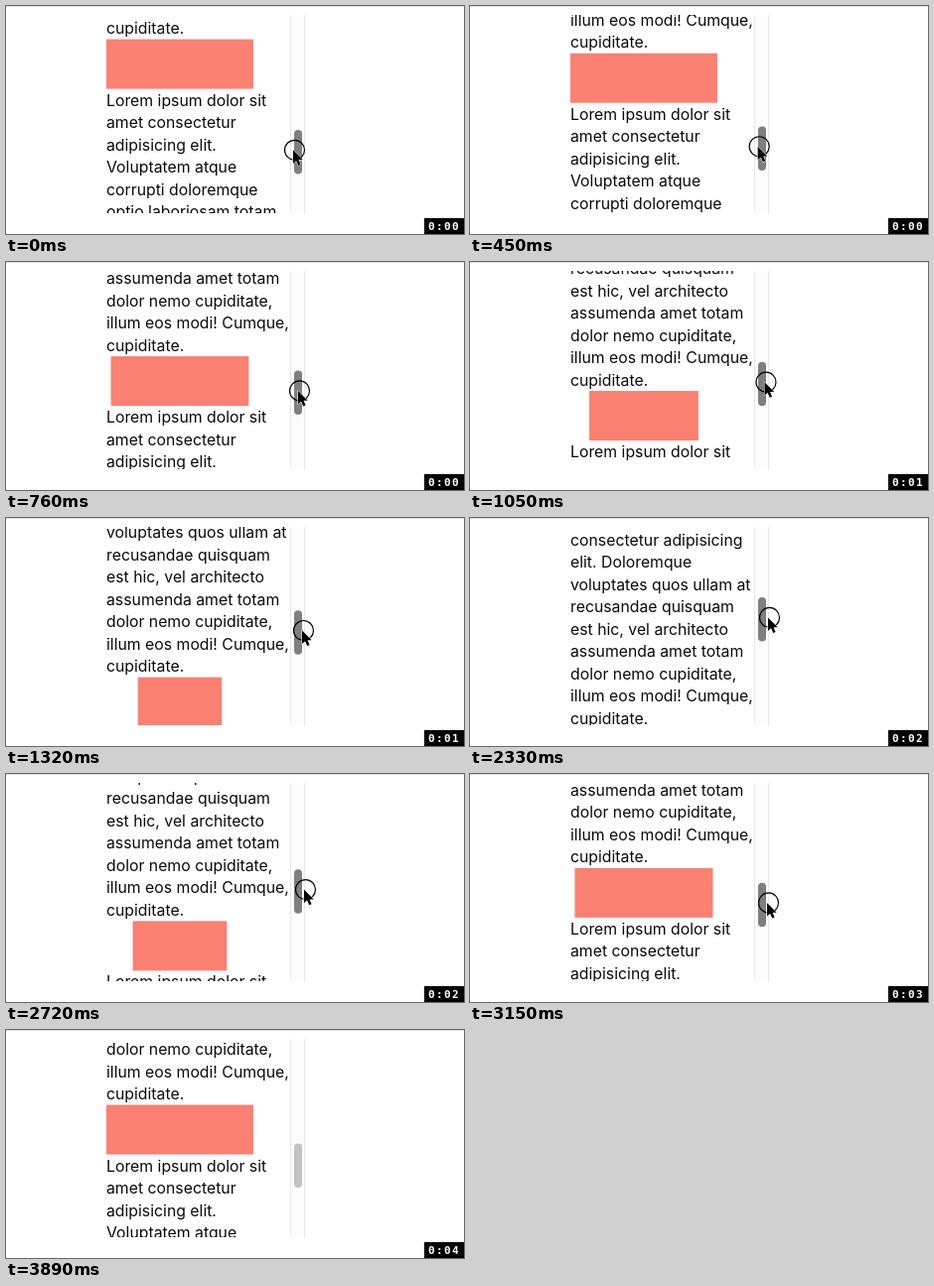
Write an HTML page that moves like this. It is 461 px wide and 230 px high and loops after 4.4 s.

```html
<!DOCTYPE html>
<html lang="en">
<head>
<meta charset="utf-8">
<title>Scroll-driven scale</title>
<style>
  html, body { margin: 0; width: 100%; height: 100%; overflow: hidden; background: #fff; }
  svg { display: block; width: 461px; height: 230px; }
  .copy { font: 15.8px Inter, "Noto Sans", sans-serif; fill: #0a0a0a; }
  .clock { font: bold 11px "DejaVu Sans Mono", monospace; letter-spacing: 1.4px; fill: #fff; }
</style>
</head>
<body>
<svg viewBox="0 0 461 230">
  <defs>
    <clipPath id="port"><rect x="100" y="9" width="201" height="200"/></clipPath>
  </defs>
  <rect width="461" height="230" fill="#fff"/>
  <rect width="461" height="1" fill="#e2e2e2"/>
  <g clip-path="url(#port)">
    <g id="content" class="copy">
      <rect id="box" height="50" fill="#fa8072"/>
    </g>
  </g>
  <rect x="286" y="9" width="15" height="200" fill="#fcfcfc"/>
  <path d="M286.5 9V209M300.5 9V209" stroke="#e8e8e8"/>
  <rect id="thumb" x="290" width="8" height="44.5" rx="4"/>
  <g id="pointer">
    <circle id="ring" r="10" fill="none" stroke="#000" stroke-width="1.2"/>
    <path d="M-1.5 0V13.6L1.6 10.7L3.7 15.6L6.1 14.6L4 9.8H8.2Z"
          fill="#000" stroke="#fff" stroke-width="1" paint-order="stroke"/>
  </g>
  <rect x="421" y="214" width="40" height="16" fill="#000"/>
  <text id="clock" class="clock" x="425" y="225.5">0:00</text>
</svg>
<script>
const LOOP = 4400, SECOND = 950, RELEASE = 3555;
const LINE = 22.5, BASE = 17, LEFT = 101, BOX_W = 148, BOX_H = 50;
const PORT_TOP = 9, PORT_H = 200;

const before = ["dolor sit amet", "consectetur adipisicing", "elit. Doloremque",
  "voluptates quos ullam at", "recusandae quisquam", "est hic, vel architecto",
  "assumenda amet totam", "dolor nemo cupiditate,", "illum eos modi! Cumque,", "cupiditate."];
const after = ["Lorem ipsum dolor sit", "amet consectetur", "adipisicing elit.",
  "Voluptatem atque", "corrupti doloremque", "optio laboriosam totam"];

// [time, value]: top edge of the box, and pointer x
const boxKeys = [[0, 33.5], [140, 41], [340, 41], [760, 95], [1320, 160.5], [1820, 210.5],
  [2010, 217], [2250, 217], [2720, 148.5], [3150, 95], [3290, 80.5], [3350, 77.5],
  [3490, 77.5], [3555, 75.5], [LOOP, 75.5]];
const xKeys = [[0, 290.5], [340, 290.5], [760, 295.5], [1320, 299.5], [1820, 300.5],
  [2010, 301.5], [2720, 301.5], [3150, 300.5], [3490, 300.5], [3555, 301.2], [LOOP, 301.2]];

const $ = id => document.getElementById(id);
const clamp = (v, lo, hi) => Math.min(hi, Math.max(lo, v));
const set = (el, attrs) => { for (const k in attrs) el.setAttribute(k, attrs[k]); };

// Monotone cubic interpolation through the keys
function curve(keys) {
  const n = keys.length;
  const slope = i => (keys[i + 1][1] - keys[i][1]) / (keys[i + 1][0] - keys[i][0]);
  const tangent = keys.map((_, i) => {
    if (i === 0) return slope(0);
    if (i === n - 1) return slope(n - 2);
    const a = slope(i - 1), b = slope(i);
    return a * b > 0 ? 2 * a * b / (a + b) : 0;
  });
  return t => {
    let i = 0;
    while (i < n - 2 && t >= keys[i + 1][0]) i++;
    const [t0, v0] = keys[i], [t1, v1] = keys[i + 1];
    const h = t1 - t0, u = (t - t0) / h, w = 1 - u;
    return v0 * w * w * (1 + 2 * u) + v1 * u * u * (3 - 2 * u)
      + h * u * w * (tangent[i] * w - tangent[i + 1] * u);
  };
}

function addLine(text, y) {
  const el = document.createElementNS("http://www.w3.org/2000/svg", "text");
  el.textContent = text;
  set(el, { x: LEFT, y });
  $("content").append(el);
}
before.forEach((s, i) => addLine(s, (i - before.length) * LINE + BASE));
after.forEach((s, i) => addLine(s, BOX_H + i * LINE + BASE));

const boxTop = curve(boxKeys), pointerX = curve(xKeys);

function draw(t) {
  const top = boxTop(t);
  // Grows from 30% to full width between entering and reaching the centre
  const travel = (PORT_H + BOX_H) / 2;
  const shown = clamp((PORT_TOP + PORT_H - top) / travel, 0, 1);
  const width = BOX_W * (0.3 + 0.7 * shown);
  set($("content"), { transform: `translate(0 ${top})` });
  set($("box"), { x: LEFT + (BOX_W - width) / 2, width });

  const thumbY = 125 - (top - 33.5) / 4;
  const held = t < RELEASE;
  set($("thumb"), { y: thumbY, fill: held ? "#7f7f7f" : "#c1c1c1" });
  set($("ring"), { visibility: held ? "visible" : "hidden" });
  set($("pointer"), {
    transform: `translate(${pointerX(t)} ${thumbY + 20.3})`,
    opacity: clamp((3885 - t) / 160, 0, 1)
  });
  $("clock").textContent = "0:0" + Math.floor(t / SECOND);
}

const start = performance.now();
function tick() {
  draw((performance.now() - start) % LOOP);
  requestAnimationFrame(tick);
}
draw(0);
requestAnimationFrame(tick);
</script>
</body>
</html>
```
